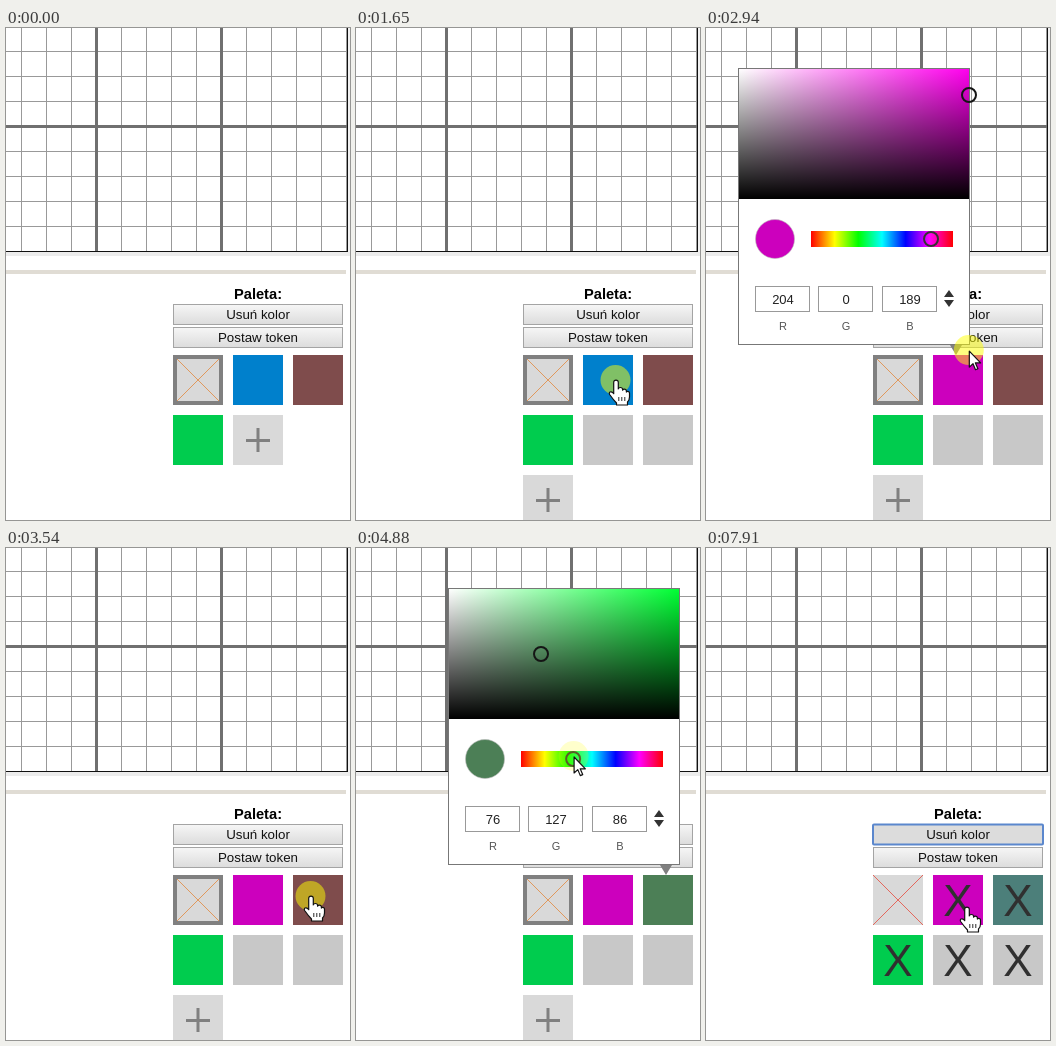
Recreate the animation shown at these times as an HTML page. Size 344 px wide and 492 px high, loop 8 s.

```html
<!DOCTYPE html>
<html lang="pl">
<head>
<meta charset="utf-8">
<title>Paleta</title>
<style>
html, body { margin: 0; width: 100%; height: 100%; overflow: hidden; background: #fff; }
svg { display: block; width: 344px; height: 492px; font-family: "Liberation Sans", Arial, sans-serif; }
text { text-anchor: middle; }
.crisp { shape-rendering: crispEdges; }
</style>
</head>
<body>
<svg id="stage" viewBox="0 0 344 492">
  <defs>
    <linearGradient id="btn" x2="0" y2="1"><stop stop-color="#f6f6f6"/><stop offset="1" stop-color="#dcdcdc"/></linearGradient>
    <linearGradient id="white"><stop stop-color="#fff"/><stop offset="1" stop-color="#fff" stop-opacity="0"/></linearGradient>
    <linearGradient id="black" x2="0" y2="1"><stop stop-opacity="0"/><stop offset="1"/></linearGradient>
    <linearGradient id="rainbow"></linearGradient>
  </defs>
</svg>
<script>
const LOOP = 8000;
const stage = document.getElementById("stage");

function add(parent, tag, attrs = {}, text) {
  const el = document.createElementNS("http://www.w3.org/2000/svg", tag);
  set(el, attrs);
  if (text !== undefined) el.textContent = text;
  parent.append(el);
  return el;
}
function set(el, attrs) {
  for (const k in attrs) el.setAttribute(k, attrs[k]);
}
const rect = (parent, x, y, width, height, fill, more) =>
  add(parent, "rect", { x, y, width, height, fill, ...more });
const label = (parent, x, y, size, text, more) =>
  add(parent, "text", { x, y, "font-size": size, ...more }, text);
const show = (el, on) => el.setAttribute("visibility", on ? "inherit" : "hidden");

// --- board ---
const board = add(stage, "g", { class: "crisp" });
for (let x = 15; x < 341; x += 25) rect(board, x, 0, 1, 223, "#999");
for (let y = 23; y < 223; y += 25) rect(board, 0, y, 341, 1, "#999");
for (const x of [89, 214]) rect(board, x, 0, 3, 223, "#707070");
rect(board, 0, 97, 341, 3, "#707070");
rect(board, 341, 0, 1, 224, "#111");
rect(board, 0, 223, 342, 1, "#111");
rect(board, 342, 0, 2, 228, "#f1f1f1");
rect(board, 0, 224, 344, 4, "#ececec");
rect(board, 0, 242, 340, 4, "#e0dcd4");

// --- palette ---
label(stage, 252, 271, 14.67, "Paleta:", { "font-weight": "bold" });
function button(y, text) {
  const box = rect(stage, 167.5, y + .5, 169, 20, "url(#btn)", { stroke: "#a4a4a4" });
  label(stage, 252, y + 15, 13.33, text, { fill: "#111" });
  return box;
}
const removeBtn = button(276, "Usuń kolor");
button(299, "Postaw token");
const focusRing = rect(stage, 167, 276.5, 170, 20, "none", { stroke: "#5b87cd", "stroke-width": 2, rx: 1 });

const slot = i => [167 + i % 3 * 60, 327 + Math.floor(i / 3) * 60];
const tiles = ["#d9d9d9", "#0080cc", "#7f4c4c", "#00cc4e", "#c8c8c8", "#c8c8c8"].map((fill, i) => {
  const [x, y] = slot(i);
  const g = add(stage, "g");
  const box = rect(g, x, y, 50, 50, fill);
  const mark = i ? label(g, x + 25, y + 41, 44, "X", { fill: "#303030" }) : null;
  return { g, box, mark };
});
const cross = add(tiles[0].g, "path", { d: "M167 327l50 50m0-50l-50 50", fill: "none" });
const frame = rect(tiles[0].g, 169, 329, 46, 46, "none", { stroke: "#808080", "stroke-width": 4 });

const plus = add(stage, "g");
rect(plus, 0, 0, 50, 50, "#d9d9d9");
rect(plus, 13, 24, 24, 3, "#808080");
rect(plus, 23.5, 13, 3, 24, "#808080");

// --- colour picker, drawn from its left edge ---
for (let i = 0; i <= 12; i++)
  add(document.getElementById("rainbow"), "stop", { offset: i / 12, "stop-color": `hsl(${i * 30},100%,50%)` });

const picker = add(stage, "g");
add(picker, "path", { d: "M212 317h12l-6 10z", fill: "#808080" });
rect(picker, .5, 40.5, 231, 276, "#fff", { stroke: "#777" });
const field = rect(picker, 1, 41, 230, 130, "red");
rect(picker, 1, 41, 230, 130, "url(#white)");
rect(picker, 1, 41, 230, 130, "url(#black)");
const swatch = add(picker, "circle", { cx: 37, cy: 211, r: 19.5, stroke: "#bbb", "stroke-width": .6 });
rect(picker, 73, 203, 142, 16, "url(#rainbow)");
const ring = { r: 7, fill: "none", stroke: "#151515", "stroke-width": 2 };
const fieldRing = add(picker, "circle", ring);
const hueRing = add(picker, "circle", { ...ring, cy: 211, stroke: "#333" });
const values = [17, 80, 144].map((x, i) => {
  rect(picker, x + .5, 258.5, 54, 25, "#fff", { stroke: "#999" });
  label(picker, x + 28, 302, 11, "RGB"[i], { fill: "#555" });
  return label(picker, x + 28, 276, 13, "", { fill: "#222" });
});
add(picker, "path", { d: "M206 269l5-7 5 7zM206 272h10l-5 7z", fill: "#333" });

// --- pointer ---
const halo = add(stage, "circle", { r: 15, fill: "#ff0" });
const outline = { fill: "#fff", stroke: "#111", "stroke-width": 1.2, "stroke-linejoin": "round" };
const arrow = add(stage, "path", { ...outline, d: "M0 0V16L3.7 12.6 6.2 18.6 8.6 17.6 6.1 11.8H11.3Z" });
const hand = add(stage, "g");
add(hand, "path", { ...outline,
  d: "M-2.3 1.5Q-2.3-.8 0-.8T2.3 1.5V8q.3-1.5 2-1.5 2.3 0 2.3 2v.7q.4-1 1.7-1 2.1 0 2.1 2v.9q.4-.8 1.2-.8 1.9 0 1.9 2V16q0 3-2 5v3H.5V22Q-2.5 19-6 14q-1.4-2.2 0-3 1.6-.7 3 .9l.7.8Z" });
add(hand, "path", { d: "M2.8 16v4m3-4v4m3-4v4", stroke: "#111", "stroke-width": .9 });

// --- timeline: [ms, x, y, linear] ---
const path = [
  [220, 296, 512], [560, 262, 413], [740, 262, 413], [890, 312, 415], [1200, 312, 415],
  [1600, 260, 353], [1930, 260, 353], [2220, 186, 212], [2530, 208, 213, 1], [2710, 226, 213, 1],
  [2800, 226, 213], [3100, 308, 455], [3240, 308, 455], [3500, 305, 349], [3720, 305, 349],
  [4330, 167, 211], [4530, 167, 211], [4880, 218, 209, 1], [5060, 235, 211, 1], [5390, 235, 211],
  [5990, 293, 456], [6550, 293, 456], [7000, 266, 289], [7200, 264, 285], [7550, 264, 285], [7890, 261, 360]
];
const sessions = [
  { tile: 1, x: 32, open: 1780, close: 3200, s: 1, v: .8,
    hue: [[2220, 202.3, 0], [2530, 256.2, 0, 1], [2710, 304.3, 0, 1]] },
  { tile: 2, x: 92, open: 3630, close: 6270, s: .4, v: .5,
    hue: [[4530, 0, 0], [4880, 132, 0, 1], [5060, 174, 0, 1]] }
];
const ADD = [690, 1090];
const REMOVE = 7240;

function sample(keys, t) {
  const i = keys.findIndex(k => k[0] > t);
  if (i < 0) return keys[keys.length - 1].slice(1, 3);
  if (i === 0) return keys[0].slice(1, 3);
  const a = keys[i - 1], b = keys[i];
  let p = (t - a[0]) / (b[0] - a[0]);
  if (!b[3]) p = p * p * (3 - 2 * p);
  return [a[1] + (b[1] - a[1]) * p, a[2] + (b[2] - a[2]) * p];
}

function hsv(h, s, v) {
  return [5, 3, 1].map(n => {
    const k = (n + h / 60) % 6;
    return Math.floor(255 * v * (1 - s * Math.max(0, Math.min(k, 4 - k, 1))) + 1e-6);
  });
}

function render(t) {
  const count = 4 + ADD.filter(a => t >= a).length;
  const removing = t >= REMOVE;
  const [x, y] = sample(path, t);

  tiles.forEach((tile, i) => {
    show(tile.g, i < count);
    if (tile.mark) show(tile.mark, removing);
  });
  const [px, py] = slot(count);
  plus.setAttribute("transform", `translate(${px} ${py})`);
  show(plus, !removing);
  show(frame, !removing);
  show(focusRing, removing);
  set(cross, { stroke: removing ? "#e4675c" : "#e0985c" });
  const overBtn = y > 276 && y < 297 && t > 6550;
  removeBtn.setAttribute("fill", removing ? "#dcdcdc" : overBtn ? "#ececec" : "url(#btn)");

  show(picker, false);
  let drag = false;
  for (const s of sessions) {
    const [h] = sample(s.hue, t);
    const rgb = hsv(h, s.s, s.v);
    const color = `rgb(${rgb})`;
    tiles[s.tile].box.setAttribute("fill", color);
    if (t < s.open || t >= s.close) continue;
    show(picker, true);
    drag = t >= s.hue[0][0] && t < s.hue[2][0] + 60;
    picker.setAttribute("transform", `translate(${s.x} 0)`);
    field.setAttribute("fill", `hsl(${h},100%,50%)`);
    swatch.setAttribute("fill", color);
    set(fieldRing, { cx: 1 + 230 * s.s, cy: 41 + 130 * (1 - s.v) });
    hueRing.setAttribute("cx", 73 + h / 360 * 142);
    values.forEach((v, i) => v.textContent = rgb[i]);
  }

  const col = x - 167, row = y - 327;
  const index = Math.floor(row / 60) * 3 + Math.floor(col / 60);
  const overTile = col >= 0 && row >= 0 && col % 60 < 50 && row % 60 < 50 && index <= count;
  show(hand, overTile);
  show(arrow, !overTile);
  const move = `translate(${x.toFixed(2)} ${y.toFixed(2)})`;
  hand.setAttribute("transform", move);
  arrow.setAttribute("transform", move);
  set(halo, { cx: x - .5, cy: y - 1, "fill-opacity": drag ? .2 : .5 });
  show(halo, t < 7330);
}

const start = performance.now();
function tick() {
  render((performance.now() - start) % LOOP);
  requestAnimationFrame(tick);
}
tick();
</script>
</body>
</html>
```
